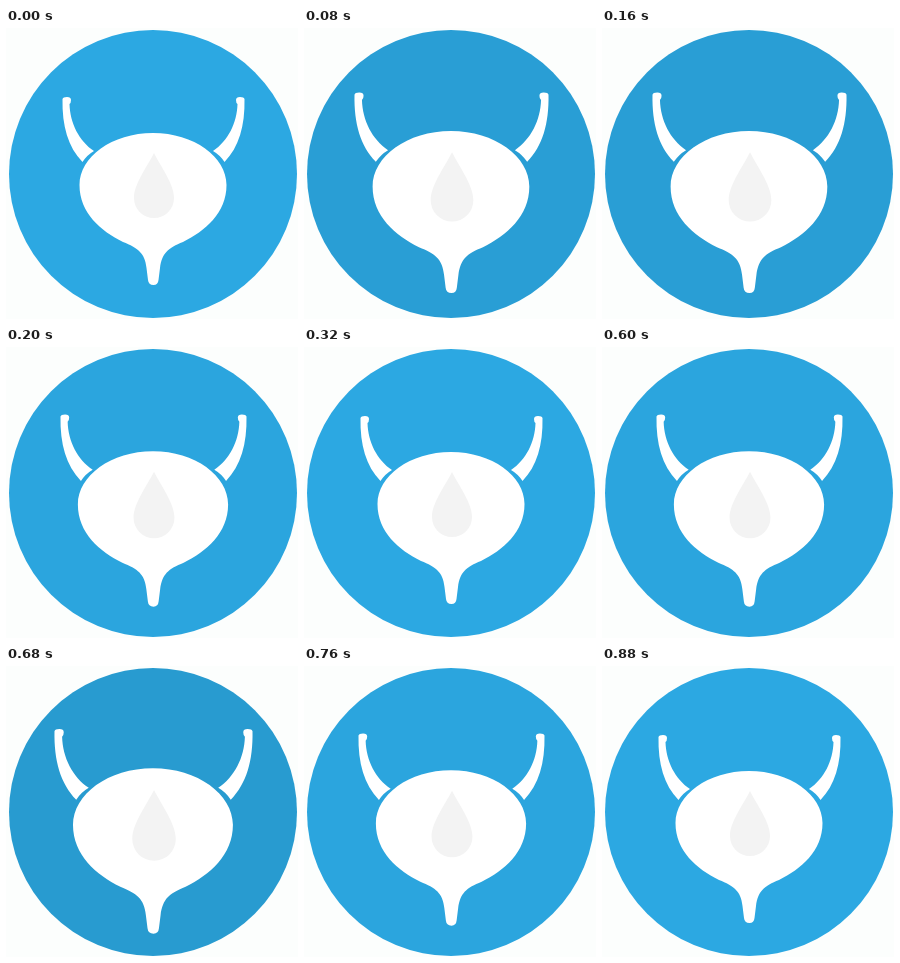
Animation of 292 by 291 pixels, one loop 2880 ms. Source, as an HTML page:

```html
<!DOCTYPE html>
<html lang="en">
<head>
<meta charset="utf-8">
<title>Bladder pulse</title>
<style>
  html, body { margin: 0; height: 100%; overflow: hidden; background: #fcfefd; }
  svg { display: block; width: 100%; height: 100%; }
</style>
</head>
<body>
<svg viewBox="0 0 292 291">
  <circle id="disc" cx="147" cy="146" r="144" fill="#2ca8e2"/>
  <g id="bladder" fill="#fff">
    <path id="horn" d="M56.500 71Q57 69 61 69Q65 69 65 72Q65 75 63.500 76C64 95 73 113 88 123Q81 127 76.500 134C62 119 56 98 56.500 71Z"/>
    <use href="#horn" transform="matrix(-1 0 0 1 295 0)"/>
    <path d="M147 105C188 105 220.500 129 220.500 157C220.500 185 199 203 177 214C162 220 156 225 154 240L152.500 252Q152 257 147.500 257Q142.500 257 142 252L140.500 240C139 225 132 220 117 214C95 203 73.500 185 73.500 157C73.500 129 106 105 147 105Z"/>
    <path fill="#f3f3f3" d="M148 125C155 139 168 156 168 170A20 20 0 0 1 128 170C128 156 141 139 148 125Z"/>
  </g>
</svg>
<script>
  const LOOP = 2880, STEP = 40, BEAT = 240, STARTS = [0, 560];
  const REST = [44, 168, 226], DARK = [40, 155, 208];
  const disc = document.getElementById('disc');
  const bladder = document.getElementById('bladder');
  const start = performance.now();

  // Strength of the pulse, 0 at rest and 1 at the peak of a beat
  function pulse(t) {
    const begin = STARTS.find(s => t >= s && t < s + BEAT);
    return begin === undefined ? 0 : Math.sin(Math.PI * (t - begin) / BEAT) ** 2;
  }

  function draw() {
    const elapsed = Math.max(0, performance.now() - start) % LOOP;
    const p = pulse(Math.floor(elapsed / STEP) * STEP);
    const colour = REST.map((c, i) => Math.round(c + (DARK[i] - c) * p));
    disc.setAttribute('fill', `rgb(${colour})`);
    bladder.setAttribute('transform',
      `translate(147.5 136) scale(${1 + 0.088 * p}) translate(-147.5 -136)`);
    requestAnimationFrame(draw);
  }
  draw();
</script>
</body>
</html>
```
